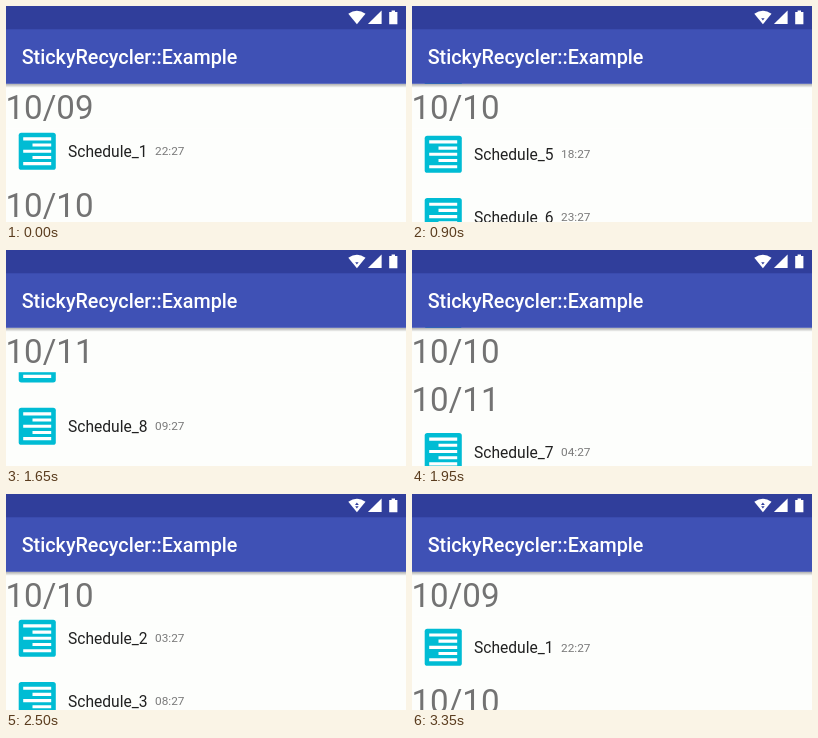
Recreate the animation shown at these times as an HTML page. Size 400 by 216 pixels, loop 3.4 s.

```html
<!DOCTYPE html>
<html lang="en">
<head>
<meta charset="utf-8">
<title>StickyRecycler::Example</title>
<style>
html, body { margin: 0; width: 100%; height: 100%; overflow: hidden; background: #fdfefc; }
svg { display: block; width: 400px; height: 216px; font-family: Roboto, sans-serif; }
.date { font-size: 33.1px; fill: #737373; }
.name { font-size: 15.6px; fill: #212121; }
.time { font-size: 11.8px; fill: #7a7a7a; }
.title { font-size: 19.75px; font-weight: 500; fill: #fff; }
</style>
</head>
<body>
<svg viewBox="0 0 400 216">
  <defs>
    <linearGradient id="shade" x2="0" y2="1">
      <stop offset="0" stop-color="#000" stop-opacity=".32"/>
      <stop offset="1" stop-color="#000" stop-opacity="0"/>
    </linearGradient>
    <g id="icon">
      <rect x="12.7" y="-18.6" width="37.1" height="37.1" rx="2.6" fill="#00bcd4"/>
      <path fill="none" stroke="#fff" stroke-width="3.1"
        d="M17.2 -12.4H45.2M26.5 -6.2H45.2M17.2 0H45.2M26.5 6.2H45.2M17.2 12.4H45.2"/>
    </g>
  </defs>
  <rect width="400" height="216" fill="#fdfefc"/>
  <g id="list"></g>
  <g id="sticky">
    <rect width="400" height="44.2" fill="#fdfefc"/>
    <text class="date" x="-.5" y="34.9"></text>
  </g>
  <rect y="77.8" width="400" height="4" fill="url(#shade)"/>
  <rect width="400" height="77.8" fill="#3f51b5"/>
  <rect width="400" height="23.3" fill="#303e9b"/>
  <text class="title" x="15.7" y="58">StickyRecycler::Example</text>
  <g fill="#fff">
    <path d="M350.9 18.2L342.3 7.8Q350.9 1.8 359.5 7.8Z"/>
    <path d="M375.6 4.5V18H361.9Z"/>
    <path d="M383.2 6H385.6V4.5H389V6H391.4V18.2H383.2Z"/>
  </g>
  <g fill="#303e9b">
    <path id="down" d="M349.2 12.3H352.6L350.9 14.5Z"/>
    <path id="up" d="M349 10.9H352.8L350.9 8.4Z"/>
  </g>
</svg>
<script>
const LOOP = 3400, TOP = 78, HEAD = 44.2, ROW = 62.3;
const $ = id => document.getElementById(id);

// [time in ms, scroll in px]
const keys = [
  [0, 8], [550, 125.5], [900, 298], [1300, 468.5], [1460, 500],
  [1600, 504], [1760, 486], [1950, 414.5], [2500, 116],
  [2780, 14], [2950, 0], [3400, 0]
];
const secants = keys.slice(1).map(([t, v], i) => (v - keys[i][1]) / (t - keys[i][0]));
const slopes = keys.map((k, i) => {
  if (!i) return secants[0] / 2;
  const a = secants[i - 1], b = secants[i];
  return b !== undefined && a * b > 0 ? 2 * a * b / (a + b) : 0;
});

function scrollAt(t) {
  let i = 0;
  while (i < keys.length - 2 && t >= keys[i + 1][0]) i++;
  const [t0, a] = keys[i], [t1, b] = keys[i + 1];
  const d = t1 - t0, u = (t - t0) / d, w = 1 - u;
  return a * w * w * (1 + 2 * u) + b * u * u * (3 - 2 * u)
    + d * u * w * (slopes[i] * w - slopes[i + 1] * u);
}

// One entry every five hours, with a header at each new day.
const heads = [];
let y = TOP, html = '';
for (let n = 1; n <= 11; n++) {
  const hour = 17 + 5 * n, day = 9 + Math.floor(hour / 24);
  const date = '10/' + String(day).padStart(2, '0');
  if (!heads.length || heads[heads.length - 1].date !== date) {
    heads.push({ date, y });
    html += `<text class="date" x="-.5" y="${y + 34.9}">${date}</text>`;
    y += HEAD;
  }
  const time = String(hour % 24).padStart(2, '0') + ':27';
  html += `<g transform="translate(0 ${y + ROW / 2})"><use href="#icon"/>
    <text class="name" x="62" y="6.1">Schedule_${n}</text>
    <text class="time" x="149.1" y="4.2">${time}</text></g>`;
  y += ROW;
}
$('list').innerHTML = html;
const label = $('sticky').querySelector('text');
const show = (id, on) => { $(id).style.display = on ? '' : 'none'; };

function draw() {
  const t = performance.now() % LOOP, s = scrollAt(t);
  let i = 0;
  while (i < heads.length - 1 && heads[i + 1].y - s <= TOP) i++;
  const next = heads[i + 1];
  const top = next ? Math.min(TOP, next.y - s - HEAD) : TOP;
  label.textContent = heads[i].date;
  $('sticky').setAttribute('transform', `translate(0 ${top})`);
  $('list').setAttribute('transform', `translate(0 ${-s})`);
  show('down', t >= 300);
  show('up', t >= 2250);
  requestAnimationFrame(draw);
}
draw();
</script>
</body>
</html>
```
